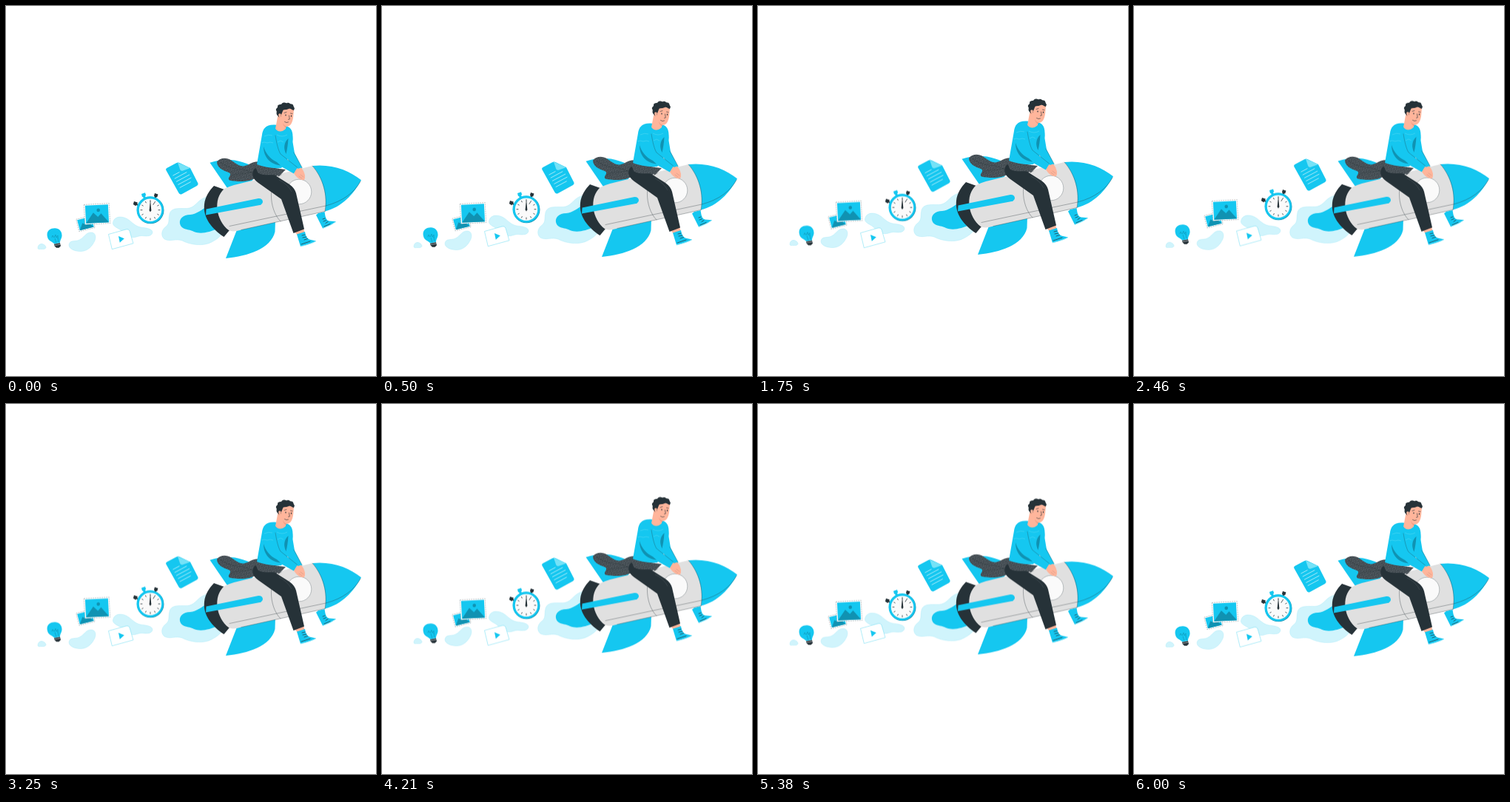
These frames come from a looping animation (500 px wide and 500 px high, 6.04 s). An HTML page:

```html
<!DOCTYPE html>
<html lang="en">
<head>
<meta charset="utf-8">
<title>Rocket ride</title>
<style>
  html, body { margin: 0; width: 100%; height: 100%; overflow: hidden; background: #fff; }
  svg { display: block; width: 100vw; height: 100vh; }
  .bob { animation: bob 3.02s linear infinite; }
  .slow { animation-duration: 6.04s; }
  .fast { animation-duration: 1.51s; }
  @keyframes bob { 50% { transform: translateY(-6px); } }
  .c { fill: #15c7f0; }
  .deep { fill: #1092b2; }
  .d { fill: #263238; }
  .skin { fill: #ffb59b; }
  .puff { fill: #d0f4fc; stroke: #a4e7f7; stroke-width: .4; }
  .line { fill: none; stroke: #263238; stroke-width: .5; stroke-linecap: round; }
  .frame { fill: #fff; stroke: #7b8a90; stroke-width: .5; stroke-dasharray: 1.8 1.2; }
</style>
</head>
<body>
<svg viewBox="0 0 500 500">
  <defs>
    <pattern id="specks" width="6" height="5" patternUnits="userSpaceOnUse" patternTransform="rotate(24)">
      <rect width="6" height="5" fill="#434c52"/>
      <path d="M1 1h.9M4 2.3h.8M2.200 3.700h.9M5 4.500h.6" stroke="#8f979c" stroke-width=".6"/>
    </pattern>
  </defs>

  <!-- smoke trail -->
  <g class="bob puff">
    <path d="M43.200 328C42.500 324 45 321.500 48 321.500C51 321.500 54 324 54 326.500C53 329 50 328.500 48 328.500C46 328.500 44.500 329 43.200 328Z"/>
    <path d="M86 320C89 316 95 319 101 315C106 312 108 306 115 306C121 306 122 312 120 317C117 324 111 331 102 331.500C92 332 82 327 86 320Z"/>
    <path d="M145 291C147 285 154 284 160 286C169 289 172 297 182 299C190 300 198 301 198 306C197 312 189 311 183 310.500C177 311 174 314 167 312C160 310 158 304 152 301C147 298 143 296 145 291Z"/>
    <path d="M272 258C260 260 257 271 248 273C239 275 224 270 221 281C219 290 222 294 215 299C210 303 209 311 214 315C221 319 230 314 238 317C249 323 267 325 278 319C284 316 289 312 292 308L288 258Z"/>
  </g>

  <!-- light bulb -->
  <g class="bob slow">
    <path class="c" d="M56 312C54 305 59 300.300 66 300.300C72 300.300 76 305 75.500 311C75 315 73 316 73 320L65 321.500C63 318 57 318 56 312Z"/>
    <path d="M62 313l1-3 2 3 2-4 1 4 2-3 0 4M66 314l2 6M70 313l1 6" fill="none" stroke="#1092b2" stroke-width=".6"/>
    <path d="M65 321.700l8-1.500 1 4-2.500 2.500-3.500 0-2.500-2.500Z" class="d"/>
    <path d="M65.500 323.500l8-1.400" stroke="#fff" stroke-width=".5"/>
  </g>

  <!-- pictures -->
  <g class="bob slow">
    <g transform="rotate(-14 107 294)">
      <rect class="frame" x="96.500" y="285.500" width="22" height="17"/>
      <rect class="c" x="97.700" y="286.700" width="19.600" height="14.600"/>
      <path class="deep" d="M97.700 301.300l6-9 4 4 3-3 6.600 8Z"/>
    </g>
    <g transform="rotate(-3 123 281)">
      <rect class="frame" x="106" y="267.500" width="34" height="27"/>
      <rect class="c" x="107.500" y="269" width="31" height="24"/>
      <path class="deep" d="M107.500 293L118 279l6 6 4.500-4.500 10 12.500Z"/>
      <circle class="deep" cx="125" cy="276" r="2.300"/>
    </g>
  </g>

  <!-- video card -->
  <g class="bob fast">
    <path d="M138.500 308.500L162 302Q166 301 167.200 304.500L172 320.800L143.300 328.700Z" fill="#fff" stroke="#7adff4" stroke-width=".6" stroke-linejoin="round"/>
    <path class="c" d="M152 311l7.800 3.300-6 5.500Z"/>
  </g>

  <!-- stopwatch -->
  <g class="bob slow">
    <path class="c" d="M183 254l5-1.800 1.300 3.700-1.300.6 1.600 4-3.200 1-1.400-3.800-1 .3Z"/>
    <path class="d" d="M201 253l4.500 1.500-1.300 4-1.200-.3-1.500 3.200-2-1 1.300-3.200-.9-.5ZM173 264l4.800 1.400-.5 2 3 1.200-1.200 2-3-1.500-.8 1.200-3.400-2.300Z"/>
    <circle class="deep" cx="195.200" cy="276" r="18.300"/>
    <circle class="c" cx="194.700" cy="275.500" r="18.200"/>
    <circle cx="195" cy="275.700" r="15.200" fill="#fafafa"/>
    <path class="line" style="stroke-width:.8" d="M195 262.500v2M195 287v2M182 275.700h2M206 275.700h2M188.500 264.400l.8 1.500M200.700 285.500l.8 1.500M183.800 269.200l1.400.8M204.800 281.400l1.400.8M201.500 264.400l-2.500 4M189.300 285.500l-.8 1.500M206.200 269.200l-1.400.8M185.200 281.400l-1.400.8"/>
    <path class="d" d="M194.800 264h.5l1 12-1.300 2.500-1.300-2.500Z"/>
    <circle cx="195" cy="276" r="1.300" class="d"/>
  </g>

  <!-- document -->
  <g class="bob slow">
    <path class="c" d="M217.800 218.700L230 212.200Q232.500 211 234.500 212L249 219L259.300 239.200Q260.300 241.700 258 243L237.500 254.200Q235 255.500 233.500 252.800L216.500 222.200Q215.200 220 217.800 218.700Z"/>
    <path d="M232 211.400L249 219L238.500 222.700Q235.500 223 235 220.500Z" fill="#75e2f7"/>
    <path d="M225.500 229.200l9-4.800M227.800 233.300l16.500-8.800M230.100 237.400l18-9.500M232.400 241.500l18-9.500M234.700 245.600l15-8" stroke="#c8f3fc" stroke-width=".8"/>
  </g>

  <!-- rocket and rider -->
  <g class="bob">
    <path class="c" d="M273 270C265 275 258 281 249 282C239 282 234 288 235 294C237 303 247 301 254 305C264 309 276 305 286 301L285 270Z"/>
    <path class="c" d="M275.500 211.700C299 204 320 208 341 221L331 239L299 246Z"/>
    <path class="c" d="M313 300L297 341C327 338 358 328 363.500 305L364 288Z"/>
    <path class="d" d="M281 243L295 248C283 261 284 290 302 303L294.500 312C278 301 266 286 268 268C269 258 275 249 281 243Z"/>
    <path d="M295 247Q301 244 308 242L414 216C429 233 435 256 431 277.500L318 302.500Q306 306 301 303C284 290 279 261 295 247Z" fill="#e0e0e0"/>
    <path class="c" d="M414 216C440 213 464 222 480 235.300C470 254 454 272 431 277.500C435 256 428 232 414 216Z"/>
    <path class="line" d="M302 297.500L432 270C455 264 471 252 479 237M318 302.500L431 277.500M414 216C429 233 435 256 431 277.500M372 228C354 234 354 274 371 291" stroke-opacity=".7"/>
    <path class="c" d="M270.500 274.500L341 260Q346 259.500 347 264Q347 267.500 343 269L270 282.500Z"/>
    <circle cx="396" cy="251" r="16.800" fill="#fafafa" stroke="#7b8488" stroke-width=".5"/>

    <!-- far foot -->
    <path class="skin" d="M421 282l8-3 2 5-8 3Z"/>
    <path class="c" d="M419 282.500L422 280L430.500 278L431.500 284Q433 290 437 290.500L446 291.300Q444 294 428 300.500Z"/>
    <path d="M428 300.500Q440 296.500 446 291.300" fill="none" stroke="#9beaf9" stroke-width="1"/>
    <path class="line" d="M428 288l3-1M429 291l3.500-1.300M432 293.500l3-2M430 298l8-3.500" style="stroke-width:.7"/>

    <!-- tied jacket and legs -->
    <path fill="url(#specks)" d="M285 210.500C289 205 298 204 305 209C311 213 314 216 321 216.500C329 215 334 209 343 210.500C352 213 357 219 370 220L366 230C356 232 350 230 340 231C331 238 314 238 302 235.500C298 232 307 228 301 225C292 222 285 218 285 210.500Z"/>
    <path class="line" d="M290 211C305 224 320 217 333 226M304 230C320 223 332 229 345 219" stroke-opacity=".6"/>
    <path class="skin" d="M390 305l12-4 2 6-9 4Z"/>
    <path class="d" d="M336 219.500C331 227 333 233 341 239L372 261L388.500 307L403 301.500L392 253Q390 246 383 241L364 229C353 220 343 219 336 219.500Z"/>
    <path fill="url(#specks)" d="M337 216L378 221L369 230C360 226 348 231 340 225Z"/>
    <path d="M369 235Q381 241 386 251" fill="none" stroke="#4c575c" stroke-width=".5"/>
    <path class="c" d="M393 308.500L404 305Q405 313 410 315.500L419 317.500Q417 320 398 325Z"/>
    <path d="M398 325Q412 321.800 419 317.500" fill="none" stroke="#9beaf9" stroke-width="1"/>
    <path class="line" d="M400 310l4-1M401 313l5-1M403 316l4.500-1.500M399 322l12-4" style="stroke-width:.7"/>

    <!-- arms and torso -->
    <path class="c" d="M379 163C386 165 387.500 174 387.500 184L390 199L400.500 219L391 225L378 202Z"/>
    <path class="skin" d="M388 222L399 218.500C402 222 405 228 403.500 233C400 236.500 395 234 391 229Z"/>
    <path class="c" d="M363 160.500C351 160 347 166 346 174L339 214Q354 220 372 219L384 202L387.500 180C388 170 386 164 378 162Z"/>
    <path class="c" d="M352 163C362 171 363 184 370 200L394 218L389 226.500L361 211C350 204 346 181 347 171Z"/>
    <path class="deep" d="M348 190C348 204 357 214 371 215.500L366 211C356 206 351 199 348 190ZM381.500 179C375 185 375 193 378.500 200C380 193 381 187 381.500 179Z"/>
    <path class="skin" d="M393.500 219L399 223C404 226 405 231 403 235C398 236 394 231 389 226.500Z"/>
    <path class="line" d="M364 175C366 187 368 195 371 200L393.500 218M389 198L400 218" stroke-opacity=".6"/>
    <path d="M345 185l4-1 4 1 4-1 4 1M367 184l4-2 4 2M349 176q6-3 11-1M366 174q7 4 14 0" fill="none" stroke="#5cdcf5" stroke-width=".5"/>
    <path class="line" d="M396 230l4 3M398 228l4 3" stroke-opacity=".25"/>

    <!-- head -->
    <path class="skin" d="M368 145L364 166Q370 173 378 166L378 162.500C384 164 387 158 388 151L389 140L374 137Z"/>
    <path d="M374 158q2 4 5 4.500l-.3 2Q375 163 374 158Z" fill="#f39b82"/>
    <path class="c" d="M363 161.500Q363 169 371 171Q377 171 379 163.500L380 166Q378 173 370.500 172.500Q361 170 361.500 161Z"/>
    <path class="d" d="M367 148C364 145 367 143 365 141C364 138 368 138 367 135C369 132 372 134 373 131.500C376 129 378 132 380 131C383 130 384 133 386 132.500C389 133 388 136 390 138L389 141C386 141 385 138 382 139C378 141 375 139 374 142L372 147Q372 150 370 150.500Q368 150 367 148Z"/>
    <path class="skin" d="M368.300 146Q371 144 371.800 147L371 151Q368 151 368.300 146Z"/>
    <path class="line" style="stroke-width:.6" d="M376 144.500l3-1M384.500 145l2.500.5M382.500 148l.8 5-1.800.3M376.500 156.500Q379 158.500 381.500 157"/>
    <ellipse class="d" cx="378" cy="147.500" rx=".7" ry="1.100"/>
    <ellipse class="d" cx="385.500" cy="148.700" rx=".7" ry="1.100"/>
  </g>
</svg>
</body>
</html>
```
